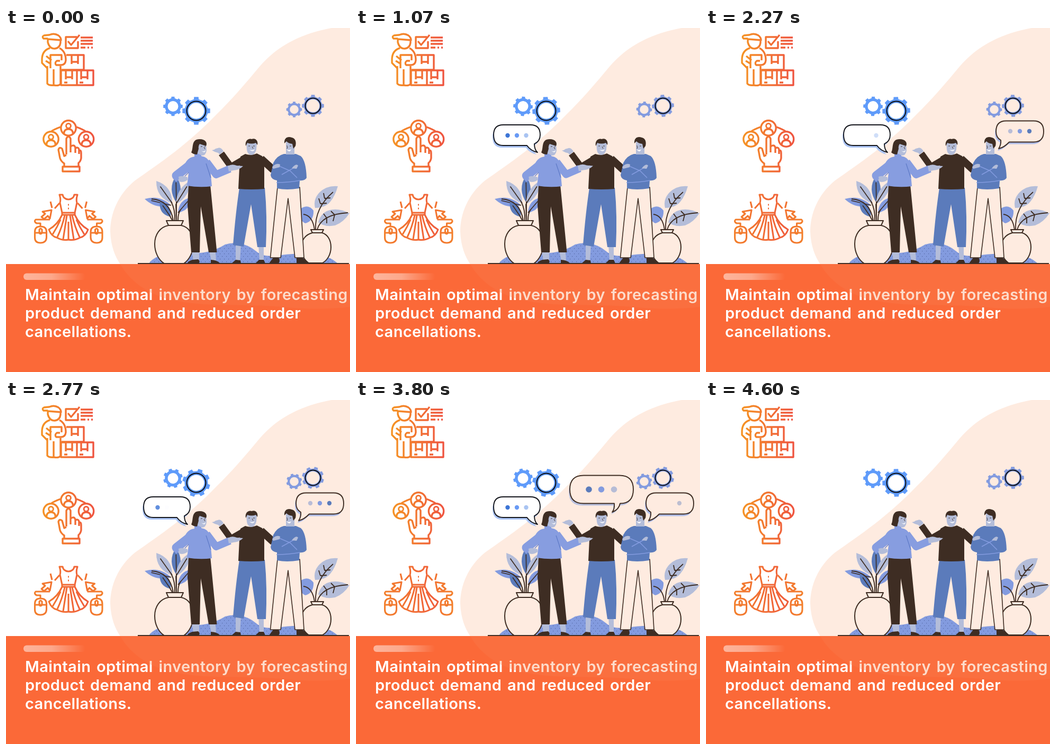
Write an HTML page with a canvas that moves like this. It is 650 px wide and 650 px high and loops after 4630 ms.

```html
<!DOCTYPE html>
<html lang="en">
<head>
<meta charset="utf-8">
<title>Inventory forecasting</title>
<style>
html, body { margin: 0; width: 100%; height: 100%; overflow: hidden; background: #fff; }
canvas { display: block; width: 650px; height: 650px; }
</style>
</head>
<body>
<canvas id="stage" width="650" height="650"></canvas>
<script>
const ctx = document.getElementById('stage').getContext('2d');
const LOOP = 4630;
const DARK = '#3e2d23', SKIN = '#b4bdd9', PEACH = '#feebe0', ORANGE = '#fb6938';
const SKY = '#839bdf', NAVY = '#5b7bbb', BRIGHT = '#5f9bfa';

const BLOB = new Path2D('M650 0H615C562 10 516 30 479 73C454 103 428 134 397 164C343 220 294 253 244 288C212 314 197 350 197 385C198 412 206 432 217 448C238 483 270 502 310 513C380 529 440 520 520 527C570 532 610 531 650 527Z');
const MOUND = new Path2D('M270 445C280 430 305 424 335 424C370 429 395 421 414 409C436 403 457 408 474 423C488 433 500 431 520 429C565 424 605 424 627 445Z');

const ramp = (t, a, b) => {
  const u = Math.min(1, Math.max(0, (t - a) / (b - a)));
  return u * u * (3 - 2 * u);
};
const pulse = (t, a, b, c, d) => ramp(t, a, b) - ramp(t, c, d);
const mix = (a, b, u) => a + (b - a) * u;

function shape(d, fill, stroke, width = 1.8) {
  const path = typeof d === 'string' ? new Path2D(d) : d;
  if (fill) { ctx.fillStyle = fill; ctx.fill(path); }
  if (stroke) { ctx.strokeStyle = stroke; ctx.lineWidth = width; ctx.stroke(path); }
}

function disc(x, y, r, fill, stroke, width) {
  const path = new Path2D();
  path.arc(x, y, r, 0, 7);
  shape(path, fill, stroke, width);
}

function placed(x, y, draw) {
  ctx.save();
  ctx.translate(x, y);
  draw();
  ctx.restore();
}

// ---- line icons ----
function iconGradient(x0, x1, from = '#f59324') {
  const g = ctx.createLinearGradient(x0, 0, x1, 0);
  g.addColorStop(0, from);
  g.addColorStop(1, '#ef5440');
  return g;
}

function parcelIcon() {
  const g = iconGradient(67, 166);
  const line = d => shape(d, null, g, 3.4);
  line('M79 20H71Q67 16 72 14L82 13Q91 9 99 14Q104 18 104 23L79 21V27Q82 39 92 39Q102 38 103 27V22');
  line('M83 38Q69 42 68 58V66L78 76M101 38Q113 44 113 61Q112 70 104 70H95Q91 66 96 62H102');
  line('M78 72V105Q81 109 90 108V78M90 108Q99 110 103 106V72M84 76V51H105V61M76 53L86 61M75 62L85 68');
  line('M134 17H113V38H136V25M117 25L123 32L139 13');
  line('M141 18H164M141 24H164M141 30H164M141 37H150M154 37H157M161 37H164');
  line('M114 51H147V79H105M104 80H165V108H104ZM134 80V108');
  for (const [x, y] of [[124, 51], [113, 80], [142, 80]])
    line(`M${x} ${y}V${y + 17}M${x} ${y + 13}H${x + 12}M${x + 12} ${y}V${y + 17}`);
  line('M110 103H116M139 103H146');
}

function choiceIcon() {
  const g = iconGradient(69, 167);
  const line = d => shape(d, null, g, 3.4);
  for (const [x, y] of [[118, 189], [85, 210], [151.5, 210]]) {
    disc(x, y, 14.2, null, g, 3.4);
    disc(x, y - 4, 4.4, null, g, 3);
    line(`M${x - 8.5} ${y + 10}Q${x - 8} ${y + 2} ${x} ${y + 2}Q${x + 8} ${y + 2} ${x + 8.5} ${y + 10}`);
  }
  line('M86 195Q92 191 103 187M150 195Q144 191 133 187');
  line('M114 239V209Q118 201 122 209V235M122 224Q129 219 131 226V236M131 227Q137 224 138 230V238M138 231Q142 230 142 236V246Q141 252 137 255V262');
  line('M114 240L110 242L106 228Q101 224 99 230L102 246Q104 252 110 256V262');
  line('M107 262H139V271H107Z');
}

function dressIcon() {
  const g = iconGradient(54, 183, '#f37f2c');
  const line = d => shape(d, null, g, 3.1);
  line('M101 315H107Q108 323 118 324Q128 323 129 315H135Q132 324 134 330Q132 340 130 349H106Q104 340 102 330Q104 324 101 315Z');
  line('M106 349V353Q98 371 81 381Q86 394 96 396Q106 402 118 400Q130 402 140 396Q150 394 155 381Q138 371 130 353V349M106 353H130');
  line('M111 354Q106 376 97 395M115 354L108 399M121 354L128 399M125 354Q130 376 139 395M118 366V400M103 362Q97 376 88 390M133 362Q139 376 148 390');
  line('M117 334H119M117 341H119');
  for (const flip of [1, -1]) {
    ctx.save();
    if (flip < 0) { ctx.translate(236.5, 0); ctx.scale(-1, 1); }
    line('M86 344L69 347L74 351L67 357L72 361L79 355L83 360ZM84 328L87 340M101 331L92 341');
    line('M54.5 385Q54.5 375 65 375Q76.5 375 76.5 385V396Q76 406 65 406Q54.5 406 54.5 396ZM55 387H76M65 374V369H58Q52 366 56 362H83');
    line('M63 381Q65 377 68 381V387Q65 391 63 387Z');
    ctx.restore();
  }
}

// ---- scenery ----
function leaf(x0, y0, x1, y1, w, fill) {
  const mx = (x0 + x1) / 2, my = (y0 + y1) / 2, len = Math.hypot(x1 - x0, y1 - y0);
  const nx = (y0 - y1) / len * w, ny = (x1 - x0) / len * w;
  shape(`M${x0} ${y0}Q${mx + nx} ${my + ny} ${x1} ${y1}Q${mx - nx} ${my - ny} ${x0} ${y0}`, fill);
  shape(`M${mix(x0, x1, .25)} ${mix(y0, y1, .25)}L${x1} ${y1}`, null, DARK, 1.7);
}

function leftPlant() {
  leaf(284, 289, 314, 331, 19, SKIN);
  leaf(321, 279, 322, 330, 17, NAVY);
  leaf(349, 288, 321, 333, 15, SKIN);
  leaf(262, 323, 312, 335, 15, SKY);
  leaf(291, 328, 311, 357, 16, NAVY);
  leaf(350, 320, 325, 349, 15, SKY);
  shape('M275 323Q309 325 316 363M312 328Q320 344 319 363M322 328V363M321 333L322 363M310 356L314 363M330 343Q325 350 325 363', null, DARK, 1.9);
  shape('M303 364H335L331 373C346 376 354 390 354 408C354 424 346 438 336 445H299C288 438 281 424 281 408C281 390 291 376 307 373ZM307 373H331', PEACH, DARK, 2);
}

function rightPlant() {
  shape('M627 299Q606 297 592 311Q580 324 584 340Q603 340 613 328Q622 317 627 299Z', SKIN);
  shape('M649 350Q625 338 606 346Q594 352 590 367Q602 377 622 373Q638 367 649 350Z', SKIN);
  shape('M553 344Q570 330 581 345Q582 364 566 369Q555 366 553 344Z', SKY);
  shape('M618 310Q583 340 585 381M602 322L600 312M602 322L613 321M594 332L591 322M594 332L606 331', null, DARK, 1.8);
  shape('M646 349Q596 352 588 381M621 353L614 346M621 353L618 365M606 359L600 351M606 359L606 369M562 352Q579 354 583 381', null, DARK, 1.8);
  shape('M576 381H600L597 387C608 390 614 401 614 414C614 428 607 439 598 444H572C563 438 558 427 558 414C558 401 566 390 579 387ZM579 387H597', PEACH, DARK, 2);
}

function mound() {
  shape(MOUND, SKY);
  ctx.save();
  ctx.clip(MOUND);
  ctx.fillStyle = '#52649f';
  for (let row = 0; row < 9; row++)
    for (let x = 268 + row % 2 * 4; x < 630; x += 8) ctx.fillRect(x, 406 + row * 5, 1.2, 1.2);
  ctx.restore();
}

function gear(x, y, r, hole, fill, angle, ring) {
  placed(x, y, () => {
    ctx.rotate(angle);
    const path = new Path2D(), step = Math.PI / 4;
    for (let i = 0; i < 8; i++)
      for (const [k, rad] of [[-.27, .84], [-.2, 1], [.2, 1], [.27, .84]]) {
        const a = (i + k) * step;
        path.lineTo(Math.cos(a) * r * rad, Math.sin(a) * r * rad);
      }
    path.closePath();
    path.moveTo(hole, 0);
    path.arc(0, 0, hole, 0, 7);
    ctx.fillStyle = fill;
    ctx.fill(path, 'evenodd');
    if (ring) disc(0, 0, ring, null, '#0c0f14', 2);
  });
}

// ---- people ----
function limb(points, width, color) {
  ctx.beginPath();
  points.forEach(p => ctx.lineTo(...p));
  ctx.strokeStyle = color;
  ctx.lineWidth = width;
  ctx.stroke();
}

function woman(t) {
  const raise = pulse(t, 120, 560, 720, 1120), sway = pulse(t, 1120, 1480, 1680, 2200);
  const tuck = Math.max(raise, sway * .4);
  const wrist = [mix(423, 422, raise), mix(266, 252, raise)];
  const hand = [mix(335, 344, tuck), mix(286, 289, tuck)];
  ctx.save();
  ctx.transform(1, 0, -.03 * sway, 1, 13.35 * sway, 0);
  shape('M351 422H365V439H354ZM384 422H396L397 439H388Z', SKIN);
  shape('M352 438L363 437Q368 441 364 445H342Q345 440 352 438ZM387 438Q398 438 405 445H387Z', DARK);
  shape('M345 296H386L398.5 424H383L368 337L366 424H350L343 335Z', DARK);

  limb([[354, 254], [mix(322, 328, tuck), mix(279, 281, tuck)], [hand[0] - 7, hand[1] - 1]], 17, '#879de0');
  shape('M356 235H369V242Q382 244 385 255L389 299Q366 302 342 298L345 274L336 264Q340 245 356 243Z', '#879de0');
  limb([[379, 253], [mix(397, 396, raise), mix(277, 267, raise)], wrist], 14, '#879de0');
  shape(`M378 256L${mix(387, 388, raise)} ${mix(283, 275, raise)}M345 273L338 280`, null, '#5d79c6', 1.2);
  placed(...hand, () => shape('M-9 -5Q-1 -8 8 -4L8 1Q0 7 -8 4Z', SKIN));
  placed(...wrist, () => shape('M-4 -5Q4 -10 13 -6L25 -5Q18 2 7 3L-2 5Z', SKIN));

  shape('M363 218H378L379 231Q378 241 370 241L362 237Z', SKIN);
  shape('M350 235C355 227 349 210 366 210C377 210 381 217 378 223L366 219Q363 223 364 228L361 239Q354 239 350 235Z', DARK);
  shape('M369 232Q374 235 377 231Q376 238 369 232Z', '#fff');
  shape('M368 224H371M375 224H377M374 225L376 229', null, DARK, .9);
  ctx.restore();
}

function speaker(t) {
  const drop = pulse(t, 120, 560, 720, 1120);
  const wrist = [mix(407, 405, drop), mix(237, 250, drop)];
  const elbow = [mix(425, 427, drop), mix(262, 265, drop)];
  shape('M434 410H444L442 439H434ZM477 411H487V439H479Z', SKIN);
  shape('M434 438L443 439L444 445H426ZM478 438H487L490 445H471Z', DARK);
  shape('M441 302H489Q494 355 491 414H475L463 333L449 413L429 410Q434 348 441 302Z', NAVY);
  limb([[482, 247], [505, 268]], 14, DARK);
  limb([[451, 247], elbow, wrist], 12, DARK);
  shape('M452 238Q463 242 474 237L484 242Q488 247 488 264V304Q464 306 439 304L441 264L443 243Z', DARK);
  placed(...wrist, () => shape('M4 -4Q-1 -13 -7 -10L-11 -9Q-14 -6 -18 -6Q-12 -2 -6 -1L-3 2Z', SKIN));
  shape('M454 217H474L473 230Q470 240 463 240Q456 238 455 230Z', SKIN);
  shape('M453 223C451 213 458 208 464 210C472 207 477 214 475 221L472 217Q464 220 456 217Z', DARK);
  shape('M460 230Q467 232 470 229Q467 236 460 230Z', '#fff');
  shape('M458 223H461M467 223H470M465 224L467 228', null, DARK, .9);
}

function listener() {
  shape('M505 434H515Q519 440 515 445H497Q500 440 505 434ZM549 434H560Q568 440 572 445H549Z', DARK);
  shape('M513 301L499.5 434H519L533 322L546 434H563L555 301Z', PEACH, DARK, 1.6);
  shape('M525 238H548L557 242Q567 251 568 283Q565 289 555 288L554 303Q530 307 512 303V288Q501 286 500 278L505 255Q512 241 525 238Z', NAVY);
  shape('M511 292Q534 292 556 288M514 260L537 270L550 283M521 277L548 262', null, SKY, 1.5);
  shape('M503 263Q510 254 518 258L517 263L505 266ZM540 265Q548 255 552 260L549 266Z', SKIN);
  shape('M529 214L546 217L545 228L545 239H529Z', SKIN);
  shape('M526 218C525 207 533 204 540 207C547 208 549 216 547 223L543 228L541 219Q533 218 530 214Z', DARK);
  shape('M530 229Q535 232 539 229Q536 237 530 229Z', '#fff');
  shape('M530 223H532M536 223H539M532 224L531 228', null, DARK, .9);
}

// ---- speech bubbles: dots run in the order given ----
const bubbles = [
  { start: 100, pivot: [343, 235], fill: '#fff', line: '#14161c', shade: '#abc4f5',
    path: 'M278 183H330Q348 183 348 202Q348 214 337 219Q337 230 343 235Q330 232 323 222H278Q260 222 260 202Q260 183 278 183Z',
    dots: [[286.5, 203, 4.2, '#3d75d6'], [304, 203, 4.2, '#699af5'], [321.5, 203, 4.2, '#a9c4f2']] },
  { start: 1170, pivot: [553, 228], fill: PEACH, line: DARK, shade: '#afbde9',
    path: 'M567 175.5H619Q638 175.5 638 195.5Q638 215.5 619 215.5H573Q563 226 553 228Q558 220 557 212Q548 207 548 195.5Q548 175.5 567 175.5Z',
    dots: [[611, 195, 4.2, '#5b7bbb'], [593, 195, 4.2, '#839bdf'], [575, 195, 4.2, '#b9bdd7']] },
  { start: 2730, pivot: [484, 212], fill: PEACH, line: DARK, shade: '#b9c1df',
    path: 'M430 142.5H498Q524 142.5 524 169Q524 195.5 499 195.5Q497 207 484 212Q489 206 488 195.5H430Q404 195.5 404 169Q404 142.5 430 142.5Z',
    dots: [[440, 169, 5.8, '#5b7bbb'], [463.5, 169, 5.8, '#839bdf'], [487.5, 169, 5.8, '#b6bcd6']] }
];
for (const b of bubbles) b.path = new Path2D(b.path);

function bubble(b, t) {
  const dt = t - b.start;
  const alpha = ramp(dt, 200, 330) * (1 - ramp(t, 3960, 4300));
  if (alpha <= 0) return;
  const settle = ramp(dt, 330, 540), slide = ramp(dt, 430, 540);
  const scale = mix(.94, 1, ramp(dt, 200, 360));
  ctx.save();
  ctx.translate(...b.pivot);
  ctx.rotate((1 - settle) * .022);
  ctx.scale(scale, scale);
  ctx.translate(-b.pivot[0], -b.pivot[1]);
  ctx.globalAlpha = alpha;
  placed(-2 * slide, 4 * slide, () => shape(b.path, b.shade));
  ctx.globalAlpha = alpha * ramp(dt, 300, 460);
  shape(b.path, b.fill, b.line, 1.9);
  b.dots.forEach(([x, y, r, color], i) => {
    const shown = ramp(dt, 230 + i * 80, 330 + i * 110);
    const blink = ramp(dt, 1950 + i * 85, 2060 + i * 85) - ramp(dt, 2570 + i * 90, 2710 + i * 90);
    ctx.globalAlpha = alpha * shown * (1 - blink);
    disc(x, y, r, color);
  });
  ctx.restore();
}

// ---- caption panel ----
function caption() {
  const lines = ['Maintain optimal inventory by forecasting', 'product demand and reduced order', 'cancellations.'];
  const write = color => {
    ctx.fillStyle = color;
    lines.forEach((s, i) => ctx.fillText(s, 36, 514 + i * 35));
  };
  ctx.fillStyle = ORANGE;
  ctx.fillRect(0, 446, 650, 204);
  ctx.font = '600 29px Inter, sans-serif';
  ctx.letterSpacing = '0.4px';
  ctx.wordSpacing = '3px';
  write('#fff');
  ctx.save();
  ctx.beginPath();
  ctx.rect(0, 446, 650, 204);
  ctx.clip();
  ctx.clip(BLOB);
  ctx.fillStyle = '#fa6f3f';
  ctx.fillRect(0, 446, 650, 204);
  write('#fddccb');
  ctx.restore();
  const g = ctx.createLinearGradient(33, 0, 150, 0);
  g.addColorStop(0, 'rgba(255,255,255,.5)');
  g.addColorStop(.45, 'rgba(255,255,255,.42)');
  g.addColorStop(1, 'rgba(255,255,255,0)');
  ctx.beginPath();
  ctx.roundRect(33, 463.5, 117, 12.5, 6);
  ctx.fillStyle = g;
  ctx.fill();
}

function draw(t) {
  ctx.fillStyle = '#fff';
  ctx.fillRect(0, 0, 650, 650);
  ctx.lineJoin = 'round';
  ctx.lineCap = 'butt';
  shape(BLOB, PEACH);
  parcelIcon();
  choiceIcon();
  dressIcon();

  const turn = t / LOOP * Math.PI;
  gear(315.5, 148, 18.5, 10, BRIGHT, -turn);
  gear(359.5, 156.5, 26.5, 15, BRIGHT, turn, 18);
  gear(544.5, 154, 15, 8.3, SKY, -turn);
  gear(580, 147, 21, 12.2, SKY, turn, 14.5);

  mound();
  leftPlant();
  rightPlant();
  speaker(t);
  woman(t);
  listener();
  bubbles.forEach(b => bubble(b, t));
  caption();
  shape('M249 445H648', null, DARK, 1.8);
}

function tick(now) {
  draw(now % LOOP);
  requestAnimationFrame(tick);
}
requestAnimationFrame(tick);
</script>
</body>
</html>
```
